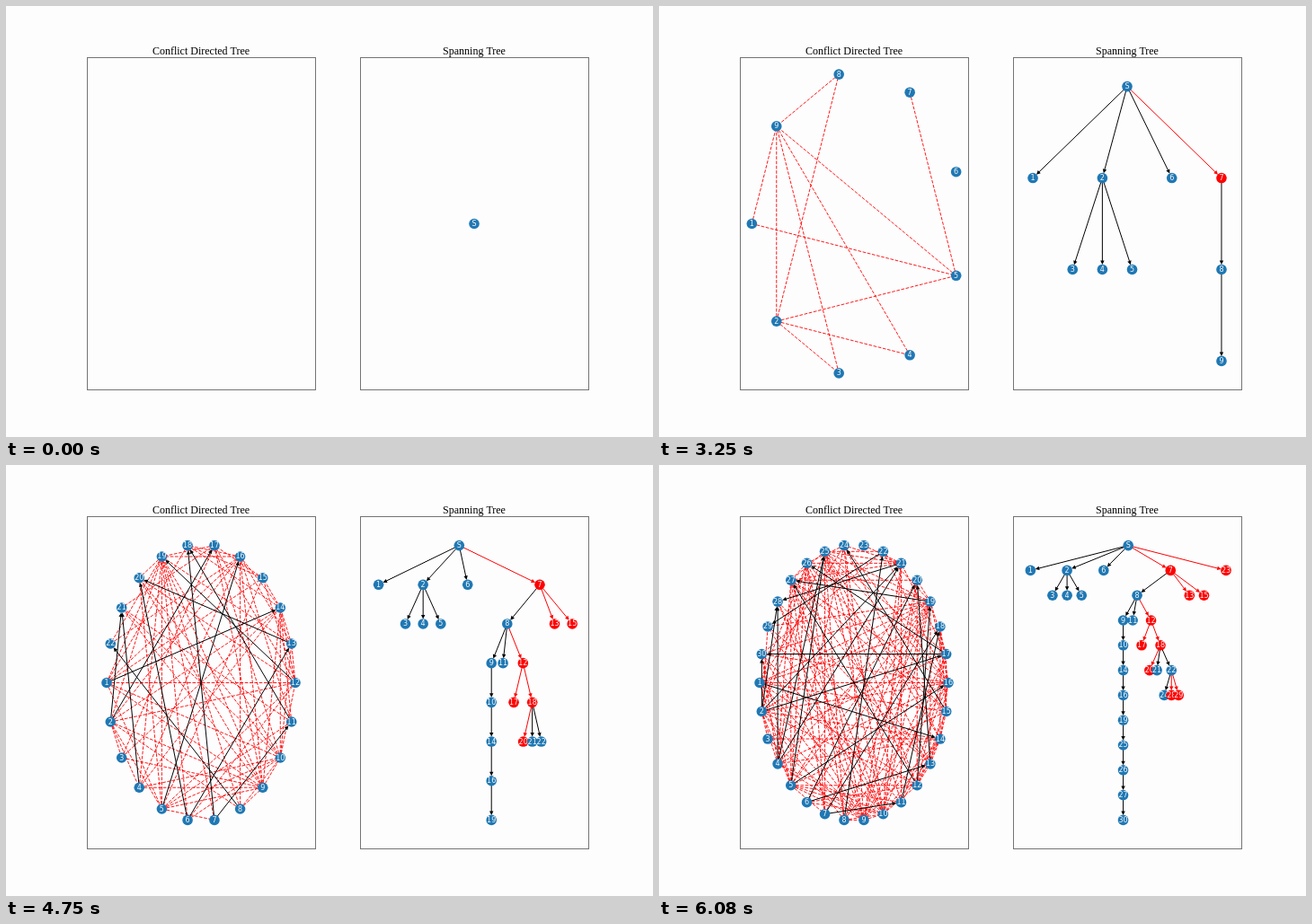
Write an HTML page with a canvas that moves like this. It is 720 px wide and 480 px high and loops after 8 s.

```html
<!DOCTYPE html>
<html lang="en">
<head>
<meta charset="utf-8">
<title>Conflict and spanning trees</title>
<style>
html, body { margin: 0; width: 720px; height: 480px; overflow: hidden; background: #fdfdfe; }
canvas { display: block; }
</style>
</head>
<body>
<canvas id="stage" width="720" height="480"></canvas>
<script>
const ctx = document.getElementById('stage').getContext('2d');
const LOOP = 8000, TOP = 57.5, W = 254, H = 370;
const BLUE = '#1f78b4', RED = '#ff0000', BLACK = '#000', FRAME = '#747474';

// [start in ms, number of nodes]
const steps = [[0, 0], [2670, 1], [2750, 3], [2830, 6], [3080, 7], [3250, 9], [3580, 10],
  [3670, 11], [3750, 12], [3830, 13], [4250, 16], [4330, 18], [4500, 20], [4580, 21],
  [4750, 22], [4920, 23], [5000, 24], [5170, 25], [5250, 26], [5330, 28], [5500, 29], [6080, 30]];

// Tree parent of nodes 1, 2, 3, ...; node 0 is the root S
const parent = [, 0, 0, 2, 2, 2, 0, 0, 7, 8, 9, 8, 8, 7, 10, 7, 14, 12, 12, 16, 18, 18, 18, 0,
  22, 19, 25, 26, 22, 22, 27];
const flagged = new Set([7, 12, 13, 15, 17, 18, 20, 23, 28, 29]);

const pairs = s => s.split(' ').map(p => p.split('-').map(Number));
const arrows = pairs('7-11 6-13 1-14 5-16 2-17 7-18 11-18 12-19 6-20 13-20 4-21 2-21 8-22 15-24 ' +
  '4-25 5-25 17-26 12-27 19-27 4-28 2-28 21-28 22-29 2-30 17-30');
const conflicts = pairs('10-12 12-13 1-12 2-12 6-12 5-12 10-13 1-10 9-10 8-10 5-10 4-10 6-10 ' +
  '8-9 1-9 2-9 3-9 4-9 5-9 2-8 2-3 2-4 2-5 1-5 5-7 5-11 16-22 17-21 15-17 12-20 13-19 ' +
  '14-24 19-25 1-15 21-23');

// Later conflicts gather around a few busy nodes
const busy = new Set([2, 5, 9, 10, 12, 14, 16, 17, 19, 25, 26, 27]);
const known = new Set([...arrows, ...conflicts].map(String));
let seed = 11;
const random = () => (seed = seed * 16807 % 2147483647) / 2147483647;
for (let b = 14; b <= 30; b++) {
  for (let a = 1; a < b; a++) {
    const chance = [0.1, 0.38, 0.75][busy.has(a) + busy.has(b)];
    if (random() < chance && b !== 23 && a !== 23 && !known.has(`${a},${b}`)) conflicts.push([a, b]);
  }
}

// Map one axis into the panel: arrow groups widen their range by 5%, then a 5% margin
function fitAxis(values, groups, start, size, pad) {
  const range = list => [Math.min(...list), Math.max(...list)];
  let [lo, hi] = range(values);
  if (hi - lo < 1e-6) return () => start + size / 2;
  const grow = (hi - lo) * pad;
  lo -= grow;
  hi += grow;
  for (const group of groups) {
    if (!group.length) continue;
    const [a, b] = range(group.flat().map(i => values[i]));
    lo = Math.min(lo, a - (b - a) * 0.05);
    hi = Math.max(hi, b + (b - a) * 0.05);
  }
  return v => start + size / 2 + (v - (lo + hi) / 2) * size / (hi - lo) / 1.1;
}

function fit(points, groups, left) {
  const fx = fitAxis(points.map(p => p[0]), groups, left, W, 0.0079);
  const fy = fitAxis(points.map(p => p[1]), groups, TOP, H, 0.0054);
  return points.map(p => [fx(p[0]), fy(p[1])]);
}

function line([x1, y1], [x2, y2], color) {
  ctx.strokeStyle = color;
  ctx.beginPath();
  ctx.moveTo(x1, y1);
  ctx.lineTo(x2, y2);
  ctx.stroke();
}

function arrow(from, to, color) {
  const dx = to[0] - from[0], dy = to[1] - from[1], d = Math.hypot(dx, dy);
  const ux = dx / d, uy = dy / d;
  const at = (back, side) => [to[0] - ux * back - uy * side, to[1] - uy * back + ux * side];
  line(from, at(8, 0), color);
  ctx.fillStyle = color;
  ctx.beginPath();
  ctx.moveTo(...at(5.5, 0));
  ctx.lineTo(...at(10, 2.2));
  ctx.lineTo(...at(10, -2.2));
  ctx.fill();
}

function node([x, y], label, color) {
  ctx.fillStyle = color;
  ctx.beginPath();
  ctx.arc(x, y, 5.8, 0, 7);
  ctx.fill();
  ctx.fillStyle = '#f5f5f5';
  ctx.font = '8px "DejaVu Sans", sans-serif';
  ctx.fillText(label, x, y + 2.5);
}

function panel(left, title) {
  ctx.strokeStyle = FRAME;
  ctx.strokeRect(left, TOP, W, H);
  ctx.fillStyle = BLACK;
  ctx.font = '12px "Liberation Serif", "Times New Roman", serif';
  ctx.fillText(title, left + W / 2 - 0.5, 54);
}

function drawConflicts(n) {
  if (!n) return;
  const shown = list => list.filter(e => e[1] <= n);
  const ring = Array.from({ length: n }, (_, i) => {
    const a = 2 * Math.PI * i / n;
    return [-Math.cos(a), Math.sin(a)];
  });
  const black = shown(arrows);
  const points = fit(ring, [black.map(e => e.map(i => i - 1))], 90);
  ctx.setLineDash([3.7, 1.6]);
  ctx.lineWidth = 0.9;
  for (const [a, b] of shown(conflicts)) line(points[a - 1], points[b - 1], RED);
  ctx.setLineDash([]);
  ctx.lineWidth = 1;
  for (const [a, b] of black) arrow(points[a - 1], points[b - 1], BLACK);
  points.forEach((p, i) => node(p, i + 1, BLUE));
}

// Average of two layouts: equal shares per child, and evenly spaced leaves
function treeLayout(n) {
  const kids = Array.from({ length: n + 1 }, () => []);
  for (let i = 1; i <= n; i++) kids[parent[i]].push(i);
  const leaves = kids.filter(k => !k.length).length;
  const points = [];
  let leaf = 0;
  function place(i, depth, center, width) {
    const share = width / kids[i].length;
    const spots = kids[i].map((k, j) => place(k, depth + 1, center - width / 2 + share * (j + 0.5), share));
    const spot = spots.length ? (spots[0] + spots.at(-1)) / 2 : leaf++ / leaves;
    points[i] = [(center + spot) / 2, depth];
    return spot;
  }
  place(0, 0, 0.5, 1);
  return points;
}

function drawTree(n) {
  const edges = [];
  for (let i = 1; i <= n; i++) edges.push([parent[i], i]);
  const black = edges.filter(e => !flagged.has(e[1]));
  const red = edges.filter(e => flagged.has(e[1]));
  const points = fit(treeLayout(n), [black, red], 394);
  for (const [a, b] of black) arrow(points[a], points[b], BLACK);
  for (const [a, b] of red) arrow(points[a], points[b], RED);
  points.forEach((p, i) => node(p, i || 'S', flagged.has(i) ? RED : BLUE));
}

function draw(n) {
  ctx.fillStyle = '#fdfdfe';
  ctx.fillRect(0, 0, 720, 480);
  ctx.textAlign = 'center';
  ctx.lineWidth = 1;
  panel(90.5, 'Conflict Directed Tree');
  panel(394.5, 'Spanning Tree');
  drawConflicts(n);
  drawTree(n);
}

let current = -1;
function tick() {
  const t = performance.now() % LOOP;
  const n = steps.findLast(s => s[0] <= t)[1];
  if (n !== current) draw(current = n);
  requestAnimationFrame(tick);
}
tick();
</script>
</body>
</html>
```
